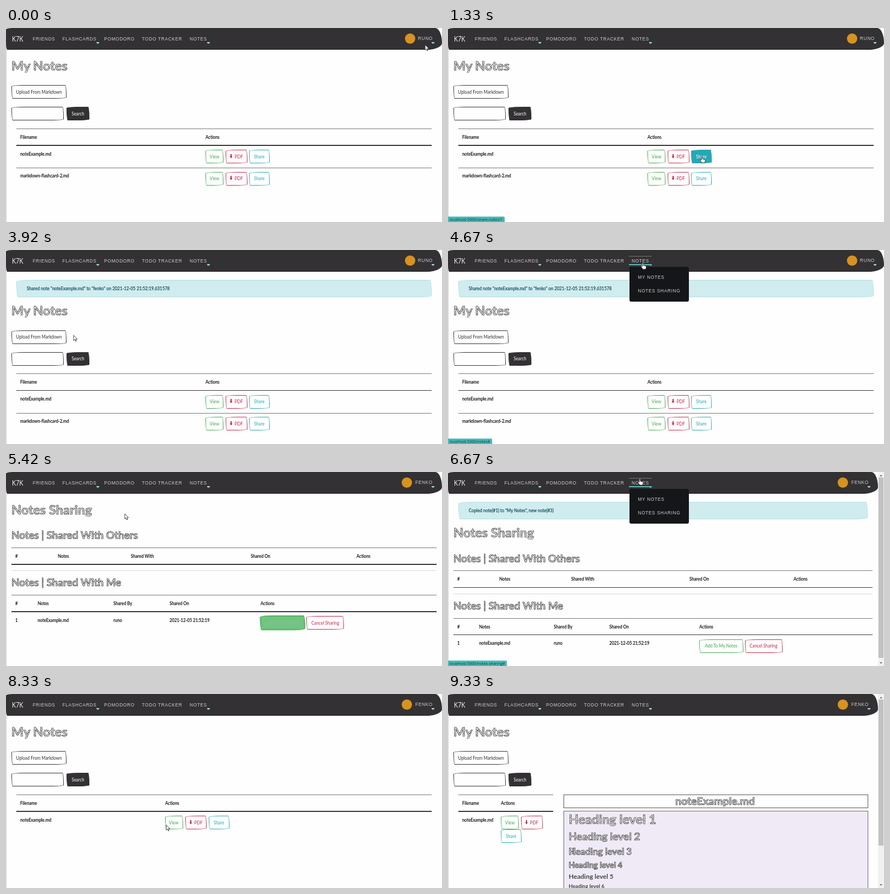
Animation of 800x357 px, one loop 9.51 s. Source, as an HTML page:

```html
<!DOCTYPE html>
<html lang="en">
<head>
<meta charset="utf-8">
<title>Sharing notes</title>
<style>
html, body { margin: 0; width: 100%; height: 100%; overflow: hidden; background: #fefefe; }
#stage { position: absolute; left: 0; top: 0; width: 800px; height: 357px; overflow: hidden; }
#stage div, #stage svg { position: absolute; box-sizing: border-box; }
.scene { inset: 0; display: none; }
.t { line-height: 20px; white-space: nowrap; transform-origin: 0 50%; }
.hand, .btn span { font: 9.5px/20px Lato, sans-serif; transform: scaleX(.83); white-space: nowrap; }
.hand { color: #222; }
.bold { font-weight: 700; color: #1c1c1c; letter-spacing: -.15px; }
.head { font-family: Lato, sans-serif; font-weight: 700; color: #444; }
.sketch { color: transparent; -webkit-text-stroke: .65px #3a3a3a; -webkit-background-clip: text; background-clip: text;
  background-image: repeating-linear-gradient(125deg, #666 0 .7px, #fff .7px 1.9px); }
.menu { font: 8.3px/20px "Liberation Sans", Arial, sans-serif; letter-spacing: .7px; color: #cfcfcf; }
.nav { background: #333133; border-bottom: 1px solid #222; border-radius: 15px 15px 33px 3px / 3px 33px 15px 15px; }
.caret { width: 5px; height: 3px; background: #58c4c0; border-top: 1px solid #cdeeed; border-radius: 0 0 3px 3px; }
.btn, .rough { border-radius: 255px 25px 225px 25px / 25px 225px 25px 255px; }
.btn { display: flex; align-items: center; justify-content: center; border: 1.5px solid var(--c); color: var(--c); }
.btn.full, .btn.on { background: var(--c); color: #fff; }
.btn.press { background: #70c680; color: #98b69c; box-shadow: 0 0 0 1.5px #7fca8c; }
.btn i { display: inline-block; width: 6px; height: 8px; margin-right: 5px; background: currentColor;
  clip-path: polygon(30% 0, 70% 0, 70% 50%, 100% 50%, 50% 100%, 0 50%, 30% 50%); }
.alert { background: #d1ecee; border: 1px solid #b5dfe2; }
.alert + .t { color: #0e5360; font-weight: 500; -webkit-text-stroke: .2px #0e5360; }
#drop { left: 333px; top: 31px; width: 109px; height: 64px; background: #151619; border-radius: 2px 4px 3px 3px; }
#glow { left: 332px; top: 11px; width: 42px; height: 17px; border-top: 1px solid #777; border-bottom: 2px solid #58bdb9; }
#status { left: 0; top: 347px; height: 10px; padding: 0 3px; background: #45bcb8; border-radius: 0 2px 0 0;
  font: 7.2px/11px "Open Sans", sans-serif; color: #12393c; white-space: nowrap; }
#cursor { left: 0; top: 0; width: 16px; height: 18px; overflow: visible; }
#cursor path { stroke: #333; stroke-width: .9; fill: #fff; stroke-linejoin: round; }
</style>
</head>
<body>
<div id="stage"></div>
<script>
const LOOP = 9510, GREEN = '#3fa84c', RED = '#c4274b', TEAL = '#26a7b4', DARK = '#333133';
const A = { name: 'runo', left: 741 }, B = { name: 'fenko', left: 735.5 };

const box = (x, y, w, h, css = '', cls = '') =>
  `<div class="${cls}" style="left:${x}px;top:${y}px;width:${w}px;height:${h}px;${css}"></div>`;
const text = (x, y, s, cls = 'hand', css = '') =>
  `<div class="t ${cls}" style="left:${x}px;top:${y - 10}px;${css}">${s}</div>`;
const bold = (x, y, s) => text(x, y, s, 'hand bold');
const head = (x, y, s, size) => text(x, y, s, size > 13 ? 'head sketch' : 'head', `font-size:${size}px`);
const line = (x, y, w, color = '#777', h = 1) => box(x, y, w, h, `background:${color}`);
const btn = (x, y, w, s, color, id = '', cls = '') =>
  `<div class="btn ${cls}" data-id="${id}" style="left:${x}px;top:${y}px;width:${w}px;height:25px;--c:${color}"><span>${s}</span></div>`;

function frame(user, W) {
  const d = W - 800;
  const items = [[49, 'FRIENDS'], [103.5, 'FLASHCARDS'], [180, 'POMODORO'], [249.5, 'TODO TRACKER'], [337, 'NOTES']];
  return line(0, 40, 1, '#d4d4d4', 317) + box(0, 0, W, 40, '', 'nav') +
    text(11, 19.5, 'K7K', 'hand', 'font-size:13px;color:#f4f4f4') +
    items.map(([x, s]) => text(x, 19.5, s, 'menu')).join('') +
    [166, 369, 781 + d].map(x => box(x, 25.5, 5, 3, '', 'caret')).join('') +
    box(user.left + d - 9.5, 10, 19, 19, 'background:#d8921f;border-radius:50%') +
    text(0, 19, user.name.toUpperCase(), 'menu', `left:auto;right:${17 - d}px`) +
    (d ? scrollbar(user.thumb) : '');
}

function scrollbar(h) {
  const arrow = (y, tip) => `<svg style="left:791px;top:${y}px" width="7" height="4"><path d="${tip}" fill="#777"/></svg>`;
  return box(789, 0, 11, 357, 'background:#f1f1f1') + box(790, 10, 9, h, 'background:#c1c1c1') +
    arrow(4, 'M1 4L3.5 1L6 4') + arrow(350, 'M1 0L3.5 3L6 0');
}

const alertBar = (s, W) => box(19, 55, W - 38, 32, '', 'alert rough') + text(38, 71, s);

function actions(x, y, wrap) {
  return btn(x, y, 33, 'View', GREEN, 'view') + btn(x + 37, y, 39.5, '<i></i>PDF', RED) +
    (wrap ? btn(x, y + 25, 38, 'Share', TEAL) : btn(x + 80, y, 38, 'Share', TEAL, 'share'));
}

function notes(files, col, dy = 0, right = 781, wrap = false) {
  const w = right - 19;
  return head(10, 68.5 + dy, 'My Notes', 23.7) +
    btn(9.5, 105 + dy, 101.5, 'Upload From Markdown', DARK) +
    btn(9.5, 145 + dy, 96, '', DARK) + btn(111, 145 + dy, 42, 'Search', DARK, '', 'full') +
    line(19, 184.5 + dy, w) + bold(26, 200.5 + dy, 'Filename') + bold(col, 200.5 + dy, 'Actions') +
    line(19, 215 + dy, w, '#333', 1.5) +
    files.map((f, i) => {
      const y = dy + i * 40.5;
      return (i ? line(19, 216.5 + y, w) : '') + bold(26, 231.5 + y, f) + actions(col, 224 + y, wrap);
    }).join('');
}

function sharing(W, dy = 0) {
  const fit = x => 10 + (x - 10) * (W - 20) / 780, w = W - 20;
  const row = (y, xs, cells) => cells.map((s, i) => bold(fit(xs[i]), y + dy, s)).join('');
  const low = [17, 58, 197, 300, 467];
  return head(10, 68.5 + dy, 'Notes Sharing', 23.7) +
    head(10, 116 + dy, 'Notes | Shared With Others', 18.9) +
    line(10, 138.5 + dy, w) +
    row(154.5, [17, 95, 229, 449, 643], ['#', 'Notes', 'Shared With', 'Shared On', 'Actions']) +
    line(10, 169 + dy, w, '#333', 1.5) + line(10, 181 + dy, w, '#d8d8d8') +
    head(10, 203 + dy, 'Notes | Shared With Me', 18.9) +
    line(10, 226 + dy, w) + row(242, low, ['#', 'Notes', 'Shared By', 'Shared On', 'Actions']) +
    line(10, 256 + dy, w, '#333', 1.5) +
    row(272.5, low, ['1', 'noteExample.md', A.name, '2021-12-05 21:52:19']) +
    btn(fit(467), 265 + dy, 81, 'Add To My Notes', GREEN, 'add') +
    btn(fit(467) + 84, 265 + dy, 69, 'Cancel Sharing', RED);
}

function shareForm() {
  return head(10, 68.5, 'Share Notes', 23.7) +
    line(10, 114.5, 781, '#dedede', 1.5) + line(10, 126, 781, '#dedede', 1.5) +
    bold(10, 145, 'Choose friend to share:') +
    box(9.5, 152.5, 314.5, 24.5, `border:1.5px solid ${DARK};border-radius:2px 1px`) + bold(21, 165, B.name) +
    '<svg style="left:314px;top:162px" width="8" height="6"><path d="M1.5 1.5L4 4L6.5 1.5" fill="none" stroke="#888" stroke-width=".9"/></svg>' +
    btn(9.5, 187, 38.5, 'Share', TEAL, 'send', 'full') + btn(9.5, 215, 34.5, 'Back', TEAL, '', 'full');
}

function preview() {
  const sizes = [23.5, 19.2, 16.9, 14.4, 12, 9.6], ys = [230, 262, 290, 314.5, 336, 354];
  return box(211.5, 184.5, 559.5, 25.5, 'border:1px solid #555') +
    head(417, 197, 'noteExample.md', 19.6) +
    box(211.5, 215, 559.5, 160, 'border:1px solid #666;background:#f0eaf7') +
    sizes.map((s, i) => head(221.5, ys[i], `Heading level ${i + 1}`, s)).join('');
}

const files = ['noteExample.md', 'markdown-flashcard-2.md'];
const scenes = [
  [0, frame(A, 800) + notes(files, 366)],
  [2170, frame(A, 800) + shareForm()],
  [3420, frame(A, 800) + alertBar(`Shared note "noteExample.md" to "${B.name}" on 2021-12-05 21:52:19.631578`, 800) + notes(files, 366, 42.5)],
  [5080, frame(B, 800) + sharing(800)],
  [5580, frame({ ...B, thumb: 332 }, 789) + alertBar('Copied note(#1) to "My Notes", new note(#3)', 789) + sharing(789, 42.5)],
  [7330, frame(B, 800) + notes(files.slice(0, 1), 291.5)],
  [8750, frame({ ...B, thumb: 269 }, 789) + notes(files.slice(0, 1), 97, 0, 193, true) + preview()]
];

const stage = document.getElementById('stage');
stage.innerHTML = scenes.map(s => `<div class="scene">${s[1]}</div>`).join('') +
  `<div id="glow"></div><div id="drop">${text(15.5, 19, 'MY NOTES', 'menu')}${text(15.5, 44, 'NOTES SHARING', 'menu')}</div>
  <div id="status"></div>
  <svg id="cursor"><path d="M0 0V9.5L2.2 7.5L3.8 11L5.3 10.3L3.8 7H6.8Z"/>
  <path d="M-1 0Q0-1.2 1 0V4L5 5Q6.4 5.4 6 7.5L5 11H0L-3 6.8Q-3-.2-1 6Z"/>
  <path d="M-2-5H2M0-5V5M-2 5H2"/></svg>`;
const layers = [...stage.querySelectorAll('.scene')];
const [glow, drop, status, cursor] = ['glow', 'drop', 'status', 'cursor'].map(id => document.getElementById(id));
const shapes = [...cursor.children];

// time, x, y of the pointer tip
const path = [
  [0, 769, 31], [250, 764, 40], [1080, 466, 237], [2080, 466, 237], [2580, 107, 176], [3000, 30, 200], [3420, 30, 200],
  [3920, 124, 157], [4420, 352, 14], [4580, 352, 14], [4920, 385, 74], [5079, 385, 74],
  [5080, 500, 280], [5250, 500, 280], [5420, 218, 77], [6330, 352, 13], [6750, 352, 13],
  [7080, 372, 50], [7330, 372, 50], [8330, 294, 241], [8500, 308, 240], [8830, 308, 240], [9330, 229, 289]
];
// start, end, button, class, button index
const hovers = [[1080, 2170, 'share', 'on'], [5080, 5580, 'add', 'press'], [8420, 9080, 'view', 'on']];
const menus = [[4420, 5080], [6330, 7330]];
const links = [[1170, 2000, 'share-notes/1'], [4420, 5080, 'notes#'], [6330, 7330, 'notes-sharing#']];
const hands = [[1080, 2170], [3000, 3420], ...menus, [8420, 8920]];

const during = t => ([a, b]) => t >= a && t < b;
const show = (el, on) => { el.style.display = on ? 'block' : 'none'; };

function pointer(t) {
  const i = path.findIndex(p => p[0] > t);
  if (i < 0) return path[path.length - 1].slice(1);
  const [t0, x0, y0] = path[i - 1], [t1, x1, y1] = path[i];
  const u = (t - t0) / (t1 - t0), e = u * u * (3 - 2 * u);
  return [x0 + (x1 - x0) * e, y0 + (y1 - y0) * e];
}

function draw(now) {
  const t = Math.round(Math.floor((now % LOOP + 4) * .012) * 100 / 12) * 10;
  const n = scenes.filter(s => s[0] <= t).length - 1;
  layers.forEach((el, i) => show(el, i === n));
  for (const h of hovers) {
    const b = layers[n].querySelector(`[data-id=${h[2]}]`);
    if (b) b.classList.toggle(h[3], during(t)(h));
  }
  const open = menus.some(during(t)), link = links.find(during(t));
  show(glow, open);
  show(drop, open);
  show(status, link);
  if (link) status.textContent = 'localhost:5000/' + link[2];
  const kind = t >= 9080 ? 2 : hands.some(during(t)) ? 1 : 0;
  shapes.forEach((s, i) => show(s, i === kind));
  const [x, y] = pointer(t);
  cursor.style.transform = `translate(${x}px,${y}px)`;
}

function tick() {
  draw(performance.now());
  requestAnimationFrame(tick);
}
tick();
</script>
</body>
</html>
```
